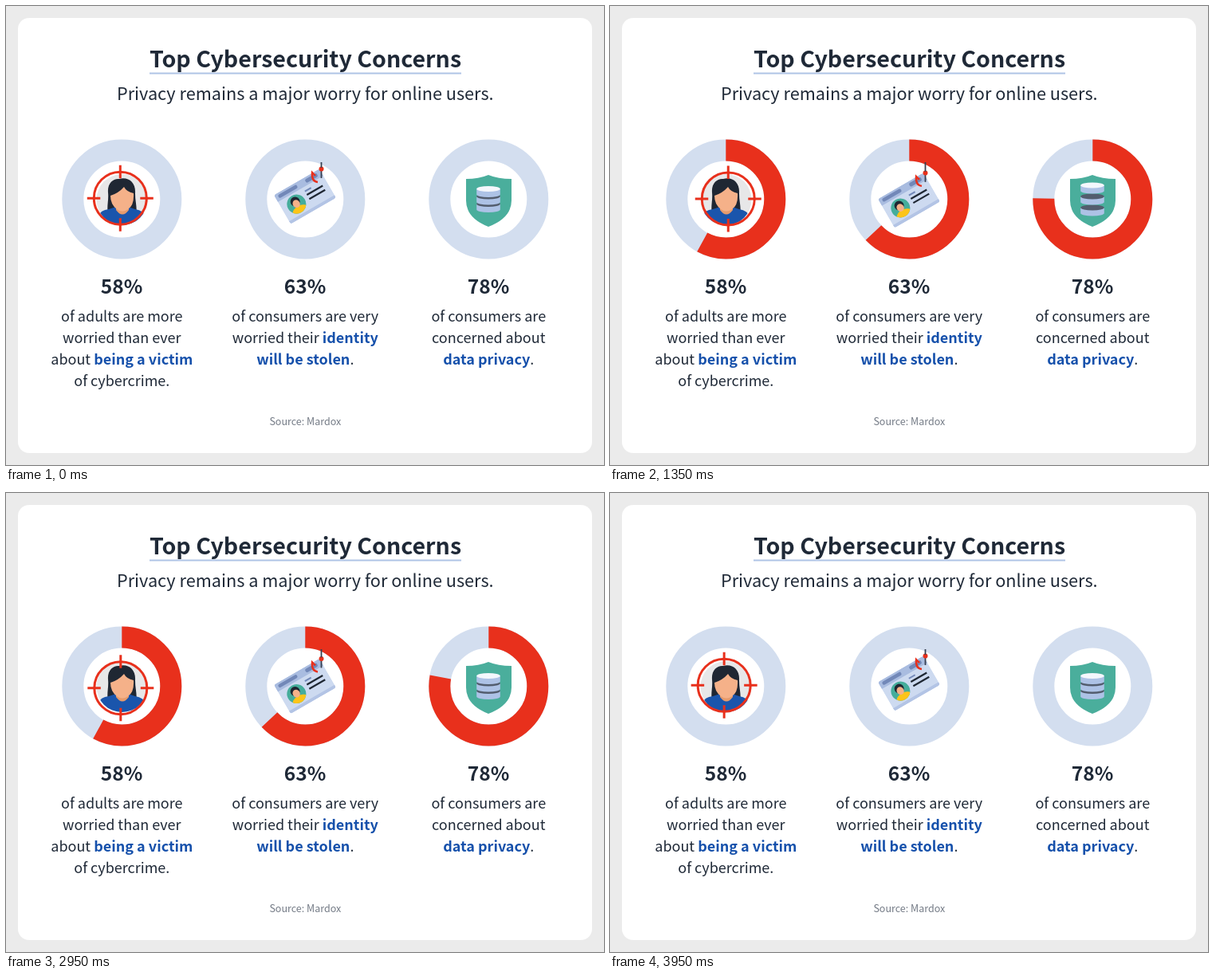
These frames come from a looping animation (750x576 px, 4000 ms). An HTML page:

```html
<!DOCTYPE html>
<html lang="en">
<head>
<meta charset="utf-8">
<title>Top Cybersecurity Concerns</title>
<style>
  html, body { margin: 0; width: 100%; height: 100%; overflow: hidden; background: #ebebeb; }
  svg { display: block; }
  text {
    font-family: "Noto Sans CJK SC", "Noto Sans CJK JP", "Noto Sans CJK", "Source Sans Pro", "Open Sans", sans-serif;
    font-size: 18px; fill: #1f2937; text-anchor: middle;
  }
  .title { font-size: 28.6px; font-weight: 700; }
  .sub { font-size: 21.7px; }
  .num { font-size: 24.5px; font-weight: 700; }
  .note { font-size: 12.5px; fill: #737a85; }
  .key { font-weight: 700; fill: #1550ab; }
  .ring { fill: none; stroke: #d3deef; stroke-width: 27; }
  .arc { stroke: #e8301c; }
</style>
</head>
<body>
<svg width="750" height="576" viewBox="0 0 750 576">
  <defs>
    <clipPath id="lens"><circle cx="145.5" cy="243" r="32"/></clipPath>
    <clipPath id="photo"><circle cx="-14" cy="3" r="12"/></clipPath>
    <clipPath id="cardShape"><rect x="-33" y="-21" width="66" height="42" rx="3"/></clipPath>
  </defs>
  <rect x="15" y="15" width="720" height="546" rx="14" fill="#fff"/>
  <text class="title" x="375.5" y="76.5">Top Cybersecurity Concerns</text>
  <rect x="180" y="83.5" width="391" height="2" fill="#afc4e6"/>
  <text class="sub" x="375.3" y="118">Privacy remains a major worry for online users.</text>

  <g id="columns"></g>
  <text class="note" x="375.3" y="526">Source: Mardox</text>

  <!-- Person in the crosshair -->
  <g clip-path="url(#lens)">
    <rect x="110" y="208" width="72" height="72" fill="#e7e7e8"/>
    <path d="M128 262C126 252 129 244 128 234C127 222 135 216 142 217C154 214 163 222 162 235C162 246 165 254 163 262Z" fill="#1f2733"/>
    <path d="M116 276V264Q118 256 129 255L138 252H153L162 255Q173 257 175 264V276Z" fill="#1a55ac"/>
    <path d="M138 246H154V256Q146 267 138 256Z" fill="#e79b6c"/>
    <path d="M131 238Q141 235 148 227Q151 233 160 235Q161 250 153 255Q146 260 139 255Q131 249 131 238Z" fill="#f5b189"/>
  </g>
  <g id="sight" fill="none" stroke="#e8301c" stroke-width="3">
    <circle r="33"/>
    <path d="M0-41.5V-25M0 25V41.5M-41.5 0H-25M25 0H41.5"/>
  </g>

  <!-- Hooked identity card -->
  <g id="card">
    <g transform="translate(375 239) rotate(-30)">
      <g clip-path="url(#cardShape)">
        <rect x="-33" y="-21" width="66" height="42" fill="#cddaf0"/>
        <rect x="-33" y="-21" width="66" height="10" fill="#a9bce0"/>
        <rect x="-33" y="17" width="66" height="4" fill="#b3c4e5"/>
      </g>
      <rect x="-29" y="-18.5" width="27" height="4.5" rx="2" fill="#7288b8"/>
      <rect x="10" y="-18.5" width="17" height="5" rx="2" fill="#7288b8"/>
      <g clip-path="url(#photo)">
        <rect x="-27" y="-10" width="26" height="26" fill="#45ad9b"/>
        <ellipse cx="-14" cy="14" rx="11" ry="8" fill="#fcc419"/>
        <circle cx="-14" cy="-.5" r="6" fill="#1f2733"/>
        <ellipse cx="-14" cy="2.5" rx="4.5" ry="5" fill="#f5b189"/>
      </g>
      <path d="M3-5.5H12" stroke="#7288b8" stroke-width="2"/>
      <path d="M3-.5H26M3 5.5H26" stroke="#1f2733" stroke-width="2.2"/>
    </g>
    <path d="M395.5 206V216" stroke="#374151" stroke-width="1.8"/>
    <path d="M391 221Q383 220 384 209L388 213" fill="none" stroke="#e8301c" stroke-width="2.4"/>
    <circle cx="395.5" cy="204.5" r="3" fill="#e8301c"/>
  </g>
  <path id="string" stroke="#374151" stroke-width="1.8"/>

  <!-- Shield with data discs -->
  <path d="M605 212Q617 217 634 217V244Q634 266 605 277Q577 266 577 244V217Q593 217 605 212Z" fill="#4aae9c"/>
  <g id="discs"></g>
</svg>
<script>
const LOOP = 4000;
const $ = id => document.getElementById(id);
const columns = [
  { x: 145, share: 58, lines: ["of adults are more", "worried than ever", "about *being a victim*", "of cybercrime."] },
  { x: 375, share: 63, lines: ["of consumers are very", "worried their *identity*", "*will be stolen*."] },
  { x: 605, share: 78, lines: ["of consumers are", "concerned about", "*data privacy*."] }
];

const bold = s => s.replace(/\*(.+?)\*/g, '<tspan class="key">$1</tspan>');
const ring = (x, cls) =>
  `<circle class="ring ${cls}" r="61.5" pathLength="100" transform="translate(${x + .3} 242.5) rotate(-90)"/>`;

$("columns").innerHTML = columns.map(({ x, share, lines }) =>
  ring(x, "") + ring(x, "arc") +
  `<text class="num" x="${x}" y="361">${share}%</text>` +
  lines.map((s, i) => `<text x="${x + .3}" y="${396 + 27 * i}">${bold(s)}</text>`).join("")
).join("");

// Lowest disc first, so each one overlaps the disc beneath it
$("discs").innerHTML = [2, 1, 0].map(i =>
  `<g><path d="M-14.8 0V7A14.8 3.5 0 0 0 14.8 7V0Z" fill="#adc2e6"/>
   <ellipse rx="14.8" ry="3.5" fill="${i ? "#535d6e" : "#f4f7fc"}"/></g>`).join("");

const arcs = [...document.querySelectorAll(".arc")];
const discs = [...$("discs").children];
const move = (el, x, y) => el.setAttribute("transform", `translate(${x} ${y})`);

// Sine ease from 0 to 1
function ease(t, start, length) {
  const u = Math.min(1, Math.max(0, (t - start) / length));
  return (1 - Math.cos(Math.PI * u)) / 2;
}

function draw(t) {
  arcs.forEach((arc, i) => {
    const fill = ease(t, 275 * i, 910) - ease(t, 3676 + 37 * i, 200);
    arc.setAttribute("stroke-dasharray", `${columns[i].share * fill} 100`);
  });

  const turn = t / LOOP * 2 * Math.PI;
  const angle = turn - 2.44;
  move($("sight"), 145.5 + 2.9 * Math.cos(angle), 242.7 + 2.4 * Math.sin(angle));

  const dip = 3.2 * (1 - Math.cos(turn));
  move($("card"), 0, dip);
  $("string").setAttribute("d", `M395.5 196V${203 + dip}`);

  const spread = ease(t, 400, 600) - ease(t, 2000, 600);
  discs.forEach((disc, i) => move(disc, 605, 239 + (1 - i) * (9.5 + 4.5 * spread)));
}

const begin = performance.now();
function frame() {
  draw((performance.now() - begin) % LOOP);
  requestAnimationFrame(frame);
}
frame();
</script>
</body>
</html>
```
